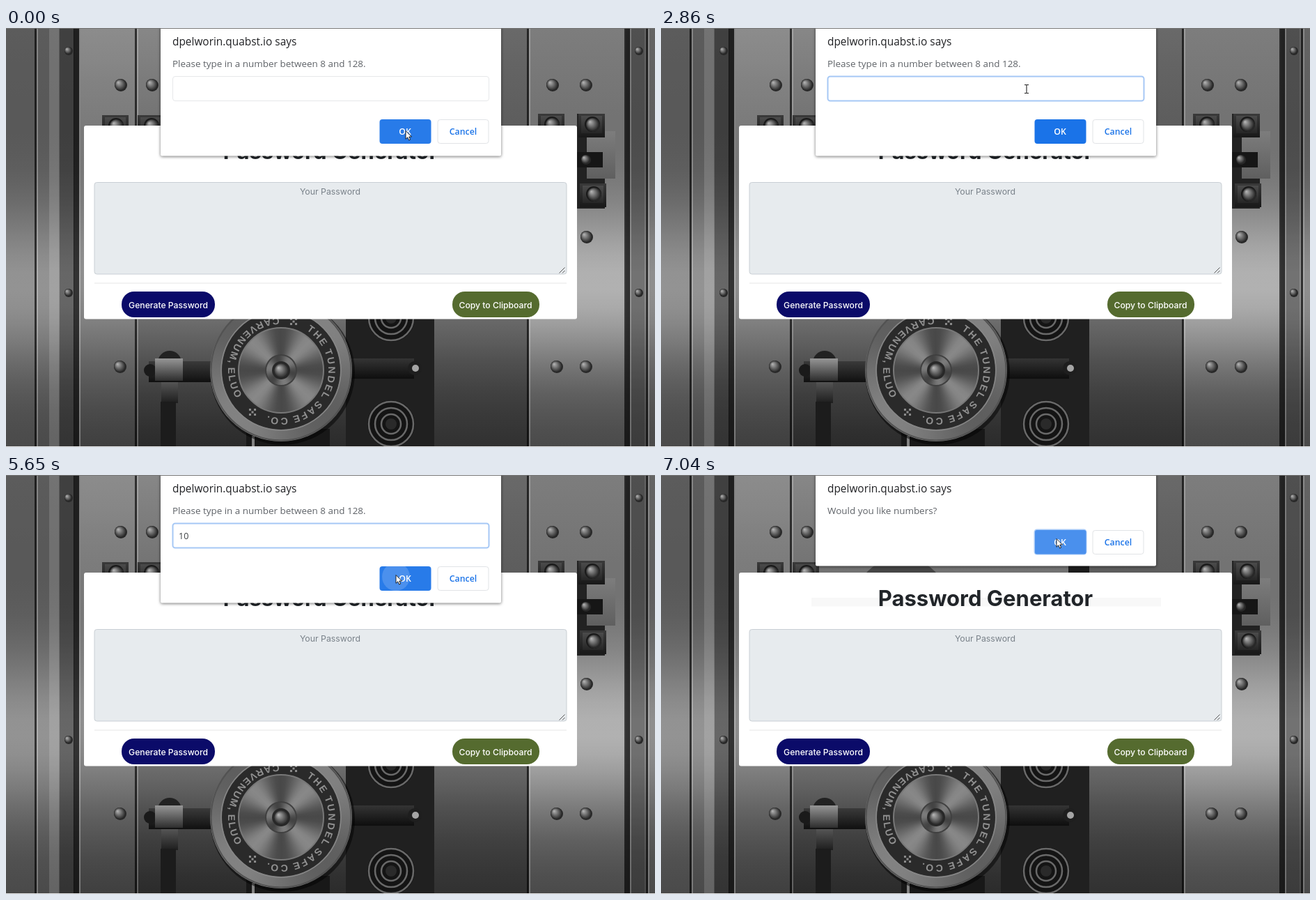
An HTML page with a canvas that plays this animation: 932x601 px, repeating every 8 s.

```html
<!DOCTYPE html>
<html lang="en">
<head>
<meta charset="utf-8">
<title>Password Generator</title>
<style>
  html, body { margin: 0; width: 100%; height: 100%; overflow: hidden; background: #444; }
  canvas, svg { position: absolute; left: 0; top: 0; width: 932px; height: 601px; display: block; }
  .page { font-family: Inter, "Open Sans", sans-serif; text-anchor: middle; }
  .ui { font-family: "Open Sans", "Noto Sans", sans-serif; }
  .head { font-size: 15.4px; fill: #202124; }
  .body { font-size: 13.45px; fill: #5f6368; }
  .btn { font-size: 12.3px; font-weight: 600; text-anchor: middle; }
  .sheet { fill: #fff; filter: drop-shadow(0 1px 2px rgba(0,0,0,.55)); }
</style>
</head>
<body>
<canvas id="photo" width="932" height="601"></canvas>
<svg viewBox="0 0 932 601" xmlns="http://www.w3.org/2000/svg">
  <defs>
    <clipPath id="okClip"><rect x="536.5" y="131" width="74" height="35" rx="4"/></clipPath>
  </defs>

  <g class="page">
    <rect x="112" y="140" width="708" height="277.5" rx="3" fill="#fff"/>
    <g id="veil">
      <rect x="216" y="126" width="502" height="14" fill="#fff" opacity=".55"/>
      <rect x="216" y="140" width="502" height="48" fill="#f8f8f8"/>
      <path d="M220 170.5H712" stroke="#ebebeb"/>
    </g>
    <rect id="strip" x="216" y="176" width="502" height="12.5" fill="#f8f8f8"/>
    <text x="466" y="187.5" font-size="31" font-weight="700" fill="#212529">Password Generator</text>
    <rect x="127" y="221.5" width="678" height="131.5" rx="3.5" fill="#e7ebee" stroke="#c9cfd4"/>
    <path d="M794.5 351.5L802.5 343.5M799 351.5L802.5 348" stroke="#555"/>
    <text x="465.5" y="239" font-size="12.3" fill="#7a828a">Your Password</text>
    <path d="M127 366H805" stroke="#e5e5e5"/>
    <rect x="166" y="378" width="134" height="37" rx="18" fill="#0b0b69"/>
    <rect x="641" y="378" width="125" height="37" rx="18" fill="#556b2f"/>
    <g font-size="12.2" font-weight="500" fill="#fff">
      <text x="233" y="401.5">Generate Password</text>
      <text x="703" y="401.5">Copy to Clipboard</text>
    </g>
  </g>

  <g id="ghost" class="ui btn" opacity=".3">
    <rect x="538" y="118" width="75" height="34" rx="4" fill="#1a73e8"/>
    <text x="574" y="138.5" fill="#0a3a80">OK</text>
    <text x="659" y="138.5" fill="#444">Cancel</text>
  </g>

  <g id="ask" class="ui">
    <rect class="sheet" x="222" y="-6" width="489" height="189.5" rx="2"/>
    <text class="head" x="239" y="25">dpelworin.quabst.io says</text>
    <text class="body" x="239" y="55.5">Please type in a number between 8 and 128.</text>
    <rect id="field" x="239.5" y="69.5" width="454" height="35" rx="3.5" fill="#fff"/>
    <text id="typed" x="248" y="91.5" font-size="12.5" fill="#3c4043"></text>
    <path id="caret" stroke="#222"/>
    <rect id="okAsk" x="536.5" y="131" width="74" height="35" rx="4"/>
    <text class="btn" x="573" y="153" fill="#fff">OK</text>
    <circle id="ripple" cx="560" cy="146" r="20" fill="#fff" opacity=".16" clip-path="url(#okClip)"/>
    <rect x="620" y="131.5" width="73" height="34" rx="3.5" fill="#fff" stroke="#e1e3e6"/>
    <text class="btn" x="656.5" y="153" fill="#1a73e8">Cancel</text>
  </g>

  <g id="confirm" class="ui">
    <rect class="sheet" x="222" y="-6" width="489" height="136.5" rx="2"/>
    <text class="head" x="239" y="25">dpelworin.quabst.io says</text>
    <text class="body" x="239" y="55.5">Would you like numbers?</text>
    <rect x="535.5" y="77.5" width="76" height="37" rx="4.5" fill="#a9cbf8"/>
    <rect id="okConfirm" x="537" y="79" width="73.5" height="34.5" rx="3"/>
    <text class="btn" x="573" y="100.5" fill="#fff">OK</text>
    <rect x="620" y="79.5" width="73" height="34" rx="3.5" fill="#fff" stroke="#e1e3e6"/>
    <text class="btn" x="656.5" y="100.5" fill="#1a73e8">Cancel</text>
  </g>

  <path id="arrow" d="M0 0V11.8L2.7 9.3L4.6 13.5L6.6 12.6L4.8 8.5H8.5Z" fill="#fff" stroke="#111" stroke-width=".9"/>
  <path id="beam" d="M-3 -6H-.8L0 -5.5L.8 -6H3M0 -5.5V5.5M-3 6H-.8L0 5.5L.8 6H3" fill="none" stroke="#222" stroke-width="1.1"/>
  <path d="M0 .5H932" stroke="#777"/>
  <path d="M0 600.5H932" stroke="#e8e8e8"/>
</svg>

<script>
const W = 932, H = 601, TAU = Math.PI * 2;
const el = id => document.getElementById(id);
const ctx = el("photo").getContext("2d");
const grey = v => `rgb(${v},${v},${v})`;
const mix = (a, b, p) => a + (b - a) * p;

// Fills a gradient with tone(p) sampled for p from 0 to 1.
function shade(gradient, tone, steps = 24) {
  for (let i = 0; i <= steps; i++) gradient.addColorStop(i / steps, grey(Math.round(tone(i / steps))));
  return gradient;
}

function rect(x, y, w, h, fill) {
  ctx.fillStyle = typeof fill === "number" ? grey(fill) : fill;
  ctx.fillRect(x, y, w, h);
}

function block(x, y, w, h, from, to) {
  rect(x, y, w, h, shade(ctx.createLinearGradient(0, y, 0, y + h), p => mix(from, to, p), 1));
}

// Steel plate of full height, lit by one soft band across its middle.
function plate(x, w, top, bottom, light) {
  const tone = p => mix(top, bottom, p) + light * Math.exp(-(((p - .62) / .2) ** 2));
  rect(x, 0, w, H, shade(ctx.createLinearGradient(0, 0, 0, H), tone));
}

function groove(x, w) {
  rect(x, 0, w, H, "rgba(0,0,0,.65)");
  rect(x + w, 0, 2, H, "rgba(255,255,255,.25)");
}

function disc(x, y, r, fill) {
  ctx.fillStyle = typeof fill === "number" ? grey(fill) : fill;
  ctx.beginPath();
  ctx.arc(x, y, r, 0, TAU);
  ctx.fill();
}

function hoop(x, y, r, width, tone) {
  ctx.strokeStyle = grey(tone);
  ctx.lineWidth = width;
  ctx.beginPath();
  ctx.arc(x, y, r, 0, TAU);
  ctx.stroke();
}

function rivet(x, y, r) {
  disc(x + 1, y + 1, r + 1, 40);
  const ball = ctx.createRadialGradient(x - r * .4, y - r * .4, 0, x, y, r);
  disc(x, y, r, shade(ball, p => mix(185, 45, p)));
}

function bolt(x, y) {
  block(x - 20, y - 15, 38, 34, 58, 24);
  block(x - 16, y - 12, 30, 25, 75, 38);
  disc(x, y, 11, 25);
  rivet(x, y, 9);
}

// Turned metal: the sheen repeats around the hub.
function turned(x, y, r, mid, swing, beams) {
  const sheen = ctx.createConicGradient(-.8, x, y);
  disc(x, y, r, shade(sheen, p => mid + swing * Math.cos(p * TAU * beams), 48));
}

// Letters on an arc in degrees; running backwards turns their tops to the hub.
function arcText(text, cx, cy, r, from, to) {
  const turn = Math.sign(to - from) * Math.PI / 2;
  const start = ctx.measureText(text[0]).width / 2;
  const middle = i => ctx.measureText(text.slice(0, i + 1)).width - ctx.measureText(text[i]).width / 2 - start;
  const span = middle(text.length - 1);
  [...text].forEach((c, i) => {
    const a = mix(from, to, middle(i) / span) * TAU / 360;
    ctx.save();
    ctx.translate(cx + r * Math.cos(a), cy + r * Math.sin(a));
    ctx.rotate(a + turn);
    ctx.fillText(c, 0, 0);
    ctx.restore();
  });
}

function ornament(x, y) {
  for (let i = 0; i < 5; i++) {
    const a = i * TAU / 4 + TAU / 8, r = i < 4 ? 5 : 0;
    rect(x + r * Math.cos(a) - 1.5, y + r * Math.sin(a) - 1.5, 3, 3, 140);
  }
}

function drawWalls() {
  plate(0, 107, 92, 72, 68);
  plate(107, 80, 140, 62, 50);
  plate(187, 428, 135, 42, 45);
  plate(615, 135, 105, 48, 45);
  plate(750, 140, 125, 72, 85);
  plate(890, 42, 100, 72, 60);
  rect(62, 0, 14, H, "rgba(255,255,255,.14)");
  rect(77, 0, 21, H, "rgba(0,0,0,.3)");
  rect(895, 0, 22, H, "rgba(0,0,0,.2)");
  for (const x of [41, 185, 748, 919]) groove(x, 3);
  for (const x of [97, 888]) groove(x, 8);
  disc(345, 186, 68, 70);
  rect(585, 122, 30, 18, 28);
  rect(488, 417, 127, 184, 32);
}

function drawFittings() {
  bolt(158, 140);
  bolt(209, 140);
  bolt(784, 138);
  rect(820, 123, 40, 136, 34);
  block(834, 148, 41, 68, 125, 95);
  rect(820, 178, 37, 22, 22);
  bolt(842, 138);
  bolt(844, 238);
  rivet(832, 188, 6);
  for (const x of [89, 908]) for (const y of [32, 379]) rivet(x, y, 5);
  for (const x of [164, 209, 784, 832]) rivet(x, 81, 8);
  for (const x of [163, 790, 832]) rivet(x, 485, 8);
  rivet(833, 299, 8);
}

function drawHandles() {
  for (const y of [416, 568]) {
    disc(553, y, 34, 20);
    for (let r = 32; r > 8; r -= 9) hoop(553, y, r, 2.5, 105);
    disc(553, y, 8, 42);
  }
  rect(345, 575, 120, 26, 24);
  rect(353, 585, 4, 16, 130);
  block(490, 474, 96, 29, 52, 14);
  disc(587, 488, 10, 30);
  disc(588, 488, 5, 165);
  block(205, 478, 95, 30, 58, 16);
  disc(207, 491, 9, 26);
  disc(235, 480, 17, 34);
  block(214, 474, 40, 32, 150, 46);
  block(223, 508, 24, 30, 85, 30);
  rect(222, 536, 22, 65, 28);
}

function drawDial(x, y) {
  disc(x + 2, y + 3, 104, "rgba(0,0,0,.5)");
  turned(x, y, 102, 112, 18, 2);
  hoop(x, y, 100.5, 2, 82);
  disc(x, y, 85, 42);
  hoop(x, y, 86, 1.5, 135);
  turned(x, y, 61, 104, 32, 4);
  hoop(x, y, 61, 2, 120);
  disc(x, y, 23, 64);
  turned(x, y, 21, 95, 28, 3);
  disc(x, y, 13, 40);
  rivet(x, y, 10);

  ctx.fillStyle = grey(145);
  ctx.font = 'bold 14px "Liberation Sans", Arial, sans-serif';
  ctx.textAlign = "center";
  ctx.textBaseline = "middle";
  arcText("THE TUNDEL SAFE CO.", x, y, 72, -54, 105);
  arcText("CARVENUM, ELUO", x, y, 72, -96, -208);
  ornament(x + 18, y - 70);
  ornament(x - 41, y + 60);
}

const LOOP = 8000, FRAME = 120, BLINK = 560;
const FOCUS = 1220, PRESS = 5220, RIPPLE = 5650, SWAP = 5780, SETTLE = 5920;
const keyTimes = [3140, 3700];

// Pointer strokes: start, end and where each one arrives.
const strokes = [
  { start: 0, end: 0, x: 574, y: 147.5 },
  { start: 120, end: 120, x: 571.5, y: 145.5 },
  { start: 270, end: 390, x: 526, y: 82 },
  { start: 540, end: 670, x: 525, y: 87.5 },
  { start: 3270, end: 3270, x: 523, y: 90 },
  { start: 4820, end: PRESS, x: 560, y: 143.5 },
  { start: 6760, end: 6890, x: 600, y: 103 },
  { start: 7040, end: 7040, x: 568, y: 91.5 }
];

function pointerAt(t) {
  const i = strokes.findLastIndex(s => s.start <= t);
  const to = strokes[i], from = strokes[Math.max(0, i - 1)];
  const step = time => Math.floor((time - to.start) / FRAME) + 1;
  const p = t >= to.end ? 1 : step(t) / step(to.end);
  return { x: mix(from.x, to.x, p), y: mix(from.y, to.y, p * (2 - p)) };
}

// The blink restarts whenever the field gains focus or a key is typed.
function caretOn(t) {
  if (t < FOCUS || t >= PRESS) return false;
  const since = keyTimes.findLast(k => k <= t) ?? FOCUS - 40;
  return Math.floor((t - since) / BLINK) % 2 === 0;
}

const show = (id, on) => { el(id).style.display = on ? "" : "none"; };
const set = (id, attrs) => { for (const k in attrs) el(id).setAttribute(k, attrs[k]); };

function update(t) {
  const second = t >= SWAP, settled = t >= SETTLE, focused = t >= FOCUS;
  const entering = second && !settled;
  const { x, y } = pointerAt(t);
  const onField = !second && y > 69 && y < 105;
  const onButton = y > (second ? 78 : 131) && y < (second ? 114 : 166);

  show("ask", !second);
  show("confirm", second);
  show("veil", entering);
  show("ghost", entering);
  show("strip", settled);
  set("confirm", { transform: `translate(0 ${entering ? -5.5 : 0})`, opacity: entering ? .9 : 1 });

  const text = "10".slice(0, keyTimes.filter(k => k <= t).length);
  el("typed").textContent = text;
  show("caret", caretOn(t));
  set("caret", { d: `M${248.5 + 7 * text.length} 78V95` });
  set("field", { stroke: focused ? "#a6c8f5" : "#e6e8ea", "stroke-width": focused ? 2 : 1 });
  set("okAsk", { fill: onButton ? "#287be9" : "#1a73e8" });
  set("okConfirm", { fill: onButton ? "#4a90ed" : "#408aec" });
  show("ripple", t >= RIPPLE);

  const shape = onField ? "beam" : "arrow";
  show("arrow", !onField);
  show("beam", onField);
  set(shape, { transform: `translate(${x} ${y})` });
}

drawWalls();
drawFittings();
drawHandles();
drawDial(395, 491);

const start = performance.now();
function tick() {
  update((performance.now() - start) % LOOP);
  requestAnimationFrame(tick);
}
tick();
</script>
</body>
</html>
```
